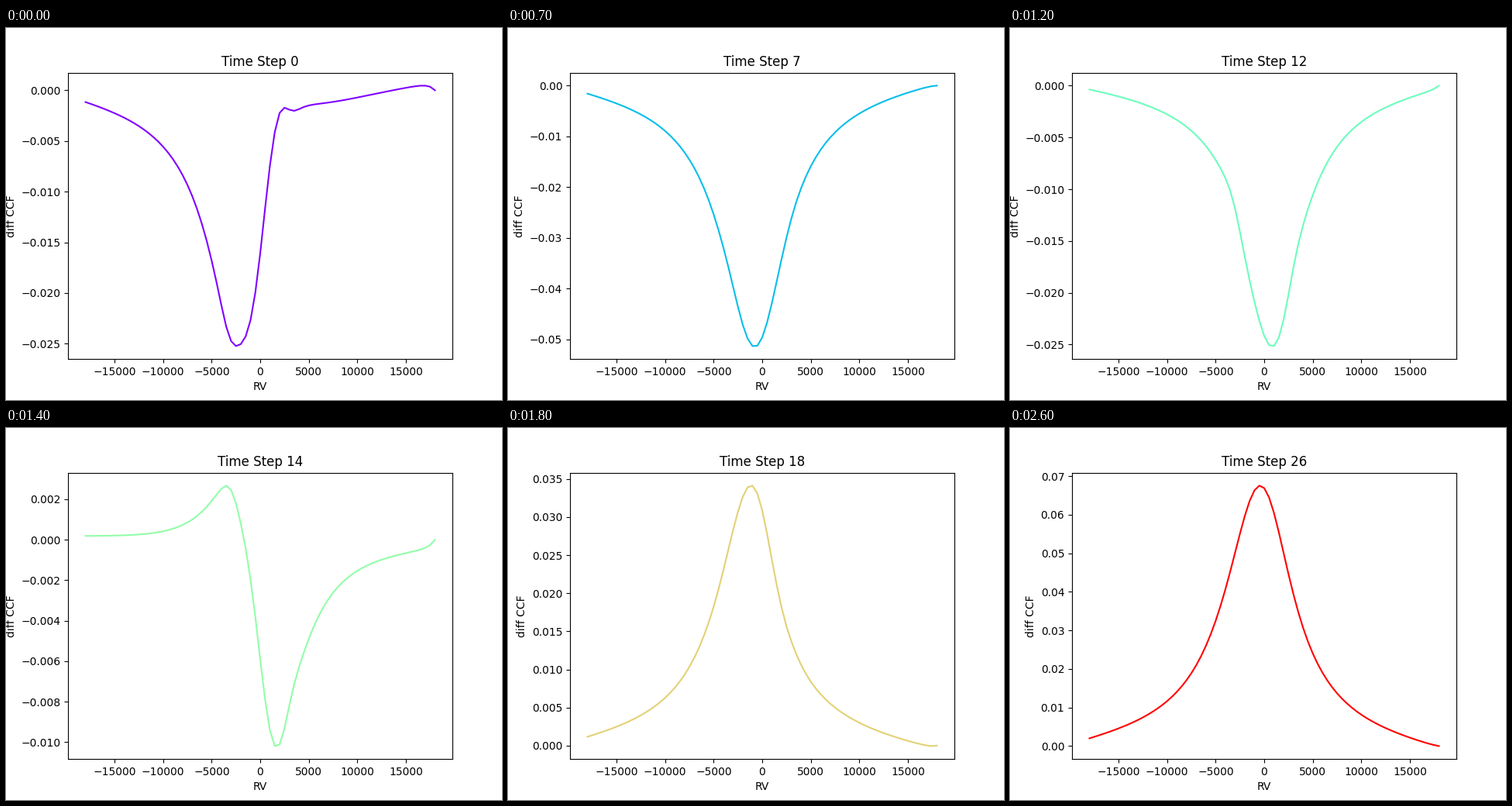
A matplotlib script for the animation above (2700 ms loop, 640 by 480 pixels).

```python
import numpy as np
import matplotlib.pyplot as plt
from matplotlib.animation import FuncAnimation

STEPS = 27
EDGE = 18000
WIDTH = 4243   # half width of the line
CORE = 2700    # half width of its flat-topped centre

# Key strengths of each part of the line, in thousandths.
KEY_STEPS = [0, 3, 10, 14, 18, 22, 26]
DEPTH = [-21.6, -43.1, -35.2, -3.35, 31.2, 55.4, 66]
SHIFT = [35.8, 38.9, 4.2, -15, -22.8, -26.4, -23.4]
SKEW = [0, -1.5, -4, -2.7, 0, 9.2, 10.5]
BUMP = [5.7, 3.8, -3.2, -2.45, -.7, .2, 0]


def ease(keys):
    """Natural cubic spline through the keys, one value per step."""
    x, y = np.array(KEY_STEPS, float), np.array(keys, float)
    n, h = len(x), np.diff(x)
    a, b = np.eye(n), np.zeros(n)
    for i in range(1, n - 1):
        a[i, i - 1:i + 2] = h[i - 1], 2 * (h[i - 1] + h[i]), h[i]
        b[i] = 6 * ((y[i + 1] - y[i]) / h[i] - (y[i] - y[i - 1]) / h[i - 1])
    m = np.linalg.solve(a, b)
    t = np.arange(STEPS)
    k = np.clip(np.searchsorted(x, t, side="right") - 1, 0, n - 2)
    p = (t - x[k]) / h[k]
    q = 1 - p
    bend = (q**3 - q) * m[k] + (p**3 - p) * m[k + 1]
    return q * y[k] + p * y[k + 1] + bend * h[k]**2 / 6


rv = np.arange(-EDGE, EDGE + 1, 500)
u = rv / EDGE


def pin(shape, power):
    """Bring a shape to zero at both edges."""
    return shape - shape[-1] * u**power


q = rv / WIDTH
lorentz = 1 / (1 + q**2)
line = pin(lorentz, 2)
tilt = pin(q * lorentz**2, 3)
twist = pin(q * lorentz**3, 3)
core = np.exp(-(rv / CORE)**4)
last = np.exp((rv - EDGE) / 600)

tracks = np.array([ease(k) for k in (DEPTH, SHIFT, SKEW, BUMP)])


def profile(step):
    depth, shift, skew, bump = tracks[:, step]
    left = .024 * depth - .018 * shift
    right = .006 * depth + .025 * shift
    base = (left * (1 - u) + right * (1 + u)) / 2 - right * last
    parts = depth * line + shift * tilt + skew * twist + bump * core
    return (base + parts) / 1000


colors = plt.cm.rainbow(np.linspace(0, 1, STEPS))
fig, ax = plt.subplots(figsize=(6.4, 4.8), dpi=100)


def draw(step):
    ax.clear()
    ax.plot(rv, profile(step), color=colors[step])
    ax.set_title(f"Time Step {step}")
    ax.set_xlabel("RV")
    ax.set_ylabel("diff CCF")


anim = FuncAnimation(fig, draw, frames=STEPS, interval=100,
                     init_func=lambda: None, repeat=True, repeat_delay=0)
plt.show()
```
